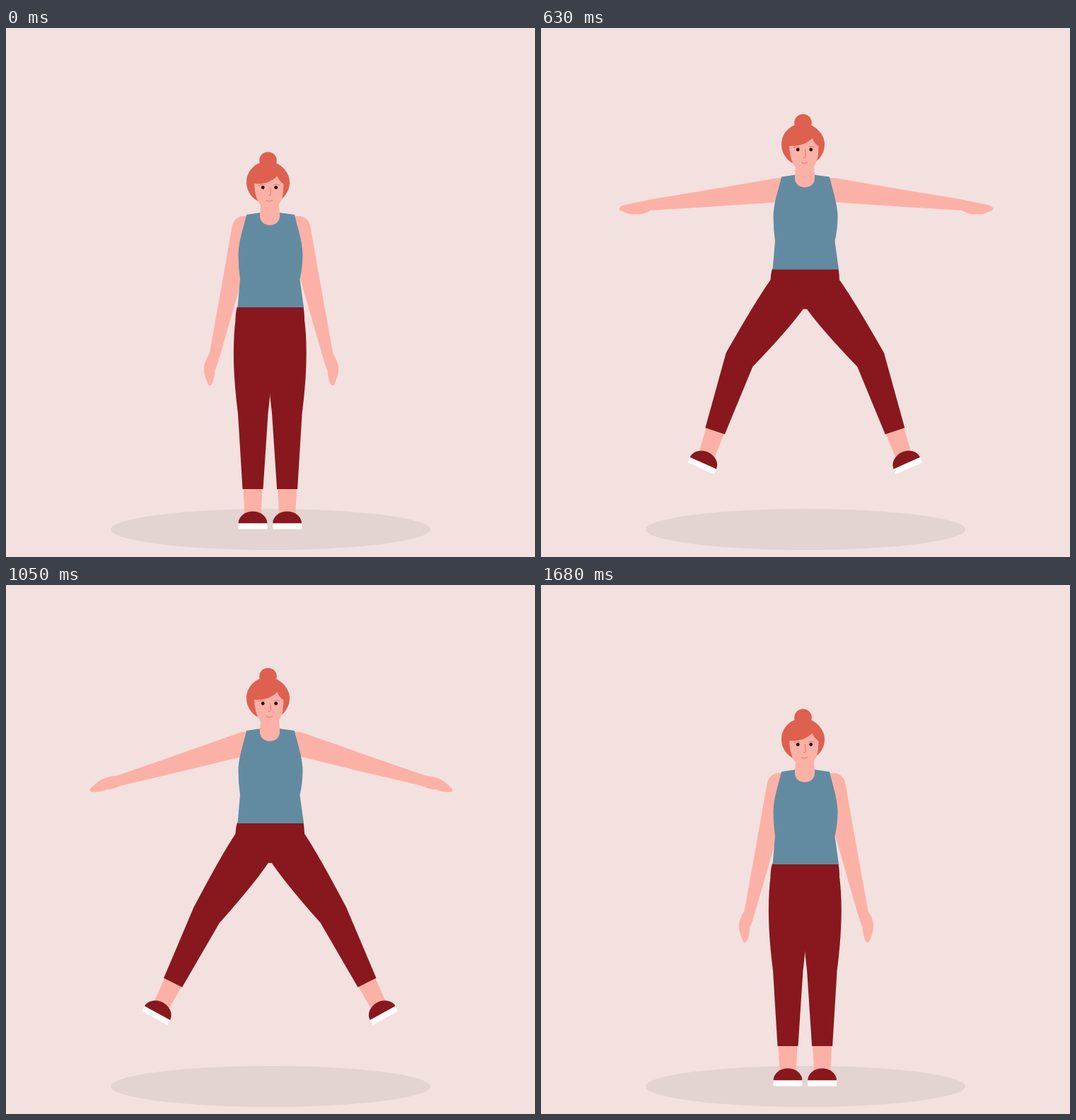
Animation, 748 px wide and 748 px high, one loop 2.1 s. Source, as an HTML page:

```html
<!DOCTYPE html>
<html lang="en">
<head>
<meta charset="utf-8">
<title>Star jump</title>
<style>
  html, body { margin: 0; height: 100%; overflow: hidden; background: #f2e1df; }
  svg { display: block; width: 100vw; height: 100vh; }
  .skin { fill: #fcb1a6; }
  .hair { fill: #de604f; }
  .red { fill: #88181d; }
  .line { fill: none; stroke: #de604f; stroke-width: .7; }
</style>
</head>
<body>
<svg viewBox="0 0 748 748">
  <ellipse cx="374" cy="709" rx="226" ry="29" fill="#e3d4d1"/>
  <g id="body">
    <g id="leg">
      <path id="ankle" class="skin"/>
      <g id="foot">
        <path class="red" d="M-20.5 15.5A20.5 17 0 0 1 20.5 15.5z"/>
        <path fill="#fff" d="M-20.5 15.5h41v8h-41z"/>
      </g>
      <path id="trouser" class="red"/>
    </g>
    <use href="#leg" transform="matrix(-1 0 0 1 746.6 0)"/>
    <path class="red" d="M327 394H420.5Q422 402 422 413L377 451H369.5L324.5 413Q324.5 402 327 394z"/>
    <g id="arm" class="skin">
      <path id="sleeve"/>
      <path id="hand"/>
    </g>
    <use href="#arm" transform="matrix(-1 0 0 1 750 0)"/>
    <path fill="#628ba1" d="M340 264C336 282 329 300 328.5 320Q328.5 338 331 355L327.5 395H421L415.5 355Q419.5 338 419.5 320C419 300 412 282 408 264L386 261H360z"/>
    <circle class="hair" cx="370.5" cy="187.5" r="12.3"/>
    <path class="hair" d="M340 218C340 201 354 188.5 370.5 188.5C385 188.5 401 202 401 218C401 235 387 248.500 370.500 248.500S340 235 340 218z"/>
    <path class="skin" d="M361 240L359 262V266C359 283 387 283 387 266V262L385 240z"/>
    <path class="skin" d="M351 220Q371 222 383.5 209.5Q386 216 392.5 221Q392 235 390.5 240Q387 248 384.5 252H361Q352 242 351 220z"/>
    <circle cx="363.2" cy="225.5" r="2.4" fill="#1c0d0d"/>
    <circle cx="381.7" cy="225.5" r="2.4" fill="#1c0d0d"/>
    <path class="line" d="M357 223Q361 220 366 222M378 222Q382 219.5 387 222M373.5 225L374.5 235Q374 237 371 237M368 244Q372.5 246.5 377 243.5"/>
  </g>
</svg>
<script>
// Angles in degrees, outward from hanging straight down; y is the body's drop
const stand = { y: 0, thigh: 0, shank: 0, foot: 0, arm: 13.2, elbow: 0, curl: 1 };
const crouch = { y: 12.5, thigh: 20.3, shank: -12.6, foot: -2, arm: 28, elbow: -60, curl: -1 };
const star = { y: -119.5, thigh: 53.5, shank: 50, foot: 50, arm: 139, elbow: 0, curl: 0 };
const land = { y: 3.5, thigh: 10, shank: -5.4, foot: 0, arm: 8.5, elbow: 0, curl: 1 };
const POSES = [stand, crouch, star, land, stand];
const MOVE = 420, STEP = 70, LOOP = MOVE * POSES.length;
const HIP = [349, 431], SHOULDER = [337, 283];

const el = id => document.getElementById(id);
const set = (id, name, value) => el(id).setAttribute(name, value);
const ease = u => u * u * (3 - 2 * u);

// Point at (x, y) in a frame placed at p and turned by deg
function at(p, deg, x, y) {
  const a = deg * Math.PI / 180, s = Math.sin(a), c = Math.cos(a);
  return [p[0] + x * c - y * s, p[1] + x * s + y * c];
}
const place = (p, deg) => `translate(${p}) rotate(${deg})`;

function drawLeg(thigh, shank, foot) {
  const knee = at(HIP, thigh, 0, 114.5), bend = (thigh + shank) / 2;
  const cuff = at(knee, shank, 0, 106.5), ankle = at(cuff, shank, 0, 33);
  set('trouser', 'd', `M325 409Q${at(HIP, thigh, -31.5, 33)} ${at(knee, bend, -21, 0)}
    L${at(cuff, shank, -14.5, 0)}L${at(cuff, shank, 14.5, 0)}
    L${at(knee, bend, 21.5, 0)}Q${at(HIP, thigh, 31, 30)} ${at(HIP, thigh, 29, -3)}z`);
  set('ankle', 'd', `M${at(cuff, shank, -13.5, -2)}L${at(cuff, shank, 13.5, -2)}
    L${at(ankle, foot, 11.5, 6)}L${at(ankle, foot, -11.5, 6)}z`);
  set('foot', 'transform', place(ankle, foot));
}

function drawArm(upper, fore, curl) {
  const elbow = at(SHOULDER, upper, 0, 99), bend = (upper + fore) / 2;
  const wrist = at(elbow, fore, 0, 87);
  set('sleeve', 'd', `M${at(SHOULDER, upper, -17.5, 0)}L${at(elbow, bend, -12, 0)}
    L${at(wrist, fore, -7.5, 0)}L${at(wrist, fore, 7.5, 0)}
    L${at(elbow, bend, 12, 0)}L${at(SHOULDER, upper, 16.5, 0)}
    A17 17 0 0 0 ${at(SHOULDER, upper, -17.5, 0)}z`);
  const outer = -8 - 4 * curl, inner = 8 - 4 * curl;
  set('hand', 'd', `M-7.5 -2Q${outer} 8 ${outer} 17Q${outer} 25 -4 38
    Q0 46 3.5 38Q${inner + 1} 27 ${inner} 20Q${inner + 3} 10 7.5 -2z`);
  set('hand', 'transform', place(wrist, fore - 2 - 2 * curl));
}

function drawAt(t) {
  const i = Math.floor(t / MOVE), u = t / MOVE - i;
  const from = POSES[i], to = POSES[(i + 1) % POSES.length];
  const mix = (part, v = u) => from[part] + (to[part] - from[part]) * ease(v);
  // Elbows straighten early in the jump; legs trail a little on the way down
  const elbowTime = from === crouch ? Math.min(1, 2 * u) : u;
  const legTime = from === star ? u ** 1.15 : u;
  const arm = mix('arm');
  set('body', 'transform', `translate(0 ${mix('y')})`);
  drawLeg(mix('thigh', legTime), mix('shank', legTime), mix('foot', legTime));
  drawArm(arm, arm + mix('elbow', elbowTime), mix('curl'));
}

const start = performance.now();
function tick() {
  const t = (performance.now() - start) % LOOP;
  drawAt(Math.floor(t / STEP) * STEP);
  requestAnimationFrame(tick);
}
tick();
</script>
</body>
</html>
```
